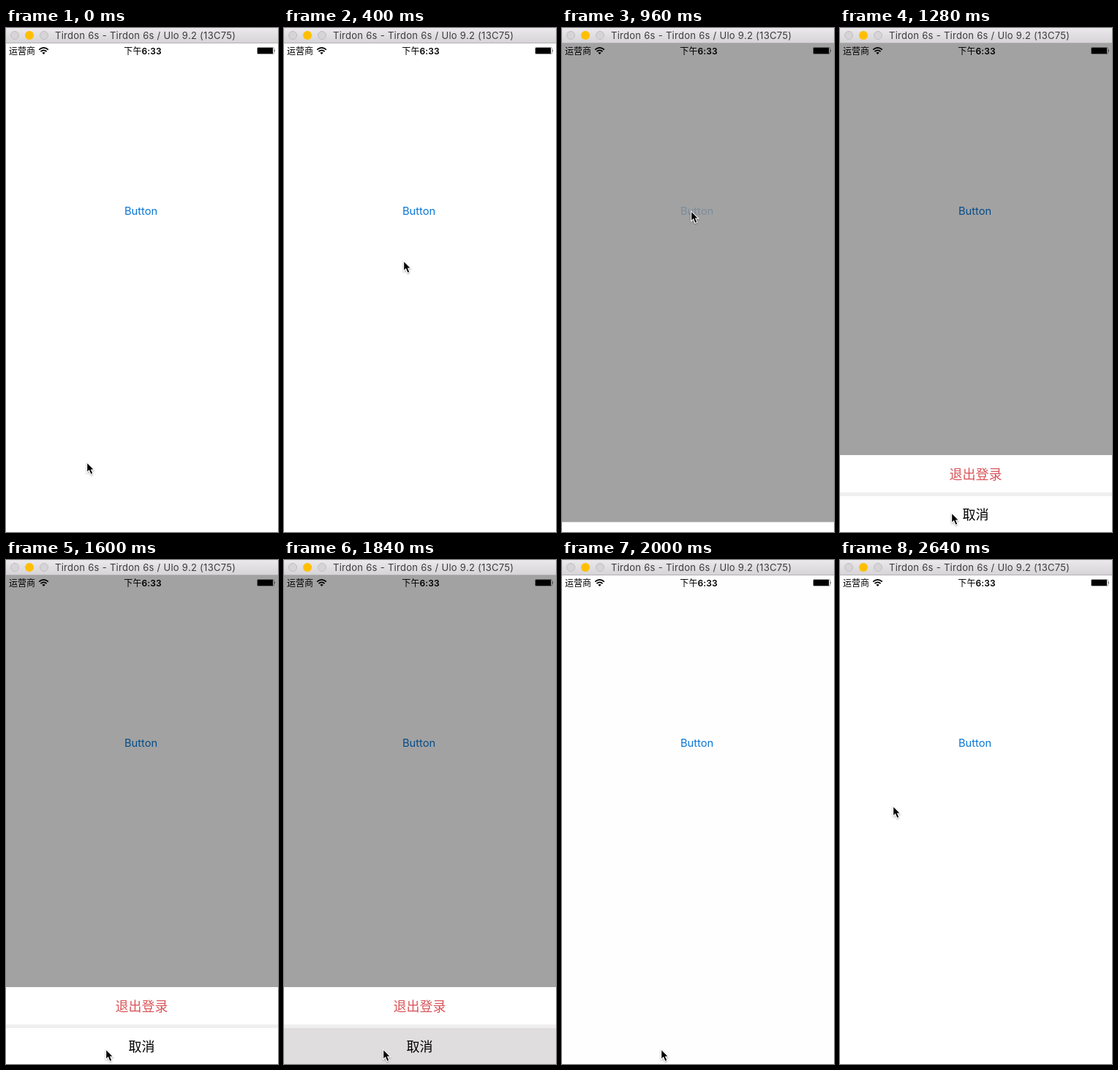
These frames come from a looping animation (372 px wide and 688 px high, 3.12 s). An HTML page:

```html
<!DOCTYPE html>
<html lang="zh-CN">
<head>
<meta charset="utf-8">
<title>Action sheet</title>
<style>
  html, body { margin: 0; width: 100%; height: 100%; overflow: hidden; background: #fff; }
  svg { display: block; }
  text { font-family: Inter, "Noto Sans CJK SC", "Noto Sans CJK", sans-serif; }
  .mid { text-anchor: middle; }
  .row { font-size: 18px; text-anchor: middle; }
</style>
</head>
<body>
<svg width="372" height="688" viewBox="0 0 372 688">
  <defs>
    <linearGradient id="chrome" x2="0" y2="1">
      <stop offset="0" stop-color="#ebe9eb"/>
      <stop offset="1" stop-color="#d6d4d6"/>
    </linearGradient>
    <filter id="shadow" x="-50%" y="-50%" width="200%" height="200%">
      <feDropShadow dx="0" dy="1" stdDeviation="0.9" flood-opacity="0.4"/>
    </filter>
  </defs>

  <rect width="372" height="688" fill="#fff"/>
  <text id="button" class="mid" x="184.5" y="255" font-size="14.7" fill="#0876d4">Button</text>
  <rect id="dim" y="21" width="372" height="667" fill="#000" fill-opacity="0.363"/>

  <g id="sheet">
    <rect y="583" width="372" height="105" fill="#fff"/>
    <rect y="634" width="372" height="5" fill="#f0eff0"/>
    <rect id="pressed" y="639" width="372" height="49" fill="#dfddde"/>
    <text class="row" x="185.5" y="616" fill="#d9555a">退出登录</text>
    <text class="row" x="185.5" y="671" fill="#000">取消</text>
  </g>

  <g id="status">
    <text x="4" y="35.5" font-size="12">运营商</text>
    <g fill="none" stroke="#000" stroke-width="1.7">
      <path d="M45.2 29.7Q51.5 24.2 57.8 29.7"/>
      <path d="M47.4 32.2Q51.5 28.7 55.6 32.2"/>
    </g>
    <path d="M49.3 33.8Q51.5 32 53.7 33.8L51.5 36Z"/>
    <text class="mid" x="187" y="35.5" font-size="12" font-weight="600" letter-spacing="0.1"><tspan font-weight="500">下午</tspan>6:33</text>
    <rect x="343.5" y="26.5" width="23" height="9" rx="1.5" fill="none" stroke="#000" stroke-opacity="0.35"/>
    <rect x="344" y="27" width="21" height="8" rx="0.5"/>
    <path d="M367 29.3q1.4 1.7 0 3.4z"/>
  </g>

  <g id="titlebar">
    <rect width="372" height="20" fill="url(#chrome)"/>
    <rect y="20" width="372" height="1" fill="#b3b1b3"/>
    <g fill="#d6d4d6" stroke="#c0bec0">
      <circle cx="12" cy="10" r="5.5"/>
      <circle cx="32" cy="10" r="6" fill="#ffbf00" stroke="none"/>
      <circle cx="52" cy="10" r="5.5"/>
    </g>
    <text x="67" y="15" font-size="13" letter-spacing="0.28" fill="#3c3c3c">Tirdon 6s - Tirdon 6s / Ulo 9.2 (13C75)</text>
  </g>

  <g id="cursor">
    <g transform="translate(-8 -5)" filter="url(#shadow)">
      <path fill="#fff" d="M8.2 4.9V20.9L12.6 16.6L13 16.5H19.8ZM9 12L13.7 23.1L17.3 21.6L12.7 10.5Z"/>
      <path d="M9.2 7.3V18.5L12.2 15.6L12.6 15.5H17.4Z"/>
      <rect x="-1" y="-4" width="2" height="8" transform="translate(13.7 17.8) rotate(-22.8)"/>
    </g>
  </g>
</svg>

<script>
const LOOP = 3120, TICK = 80, SHEET_HEIGHT = 105;
const TAP = 960, CANCEL = 1840;

// Each glide starts where the one before it ended.
const start = { x: 110, y: 592 };
const glides = [
  { from: 0, to: 720, x: 176, y: 249 },
  { from: 1040, to: 1280, x: 152, y: 661 },
  { from: 1280, to: 1680, x: 135, y: 667 },
  { from: 2080, to: 2400, x: 72, y: 335 },
];

const $ = id => document.getElementById(id);
const ramp = (t, from, to) => Math.min(1, Math.max(0, (t - from) / (to - from)));
const easeOut = p => p * (2 - p);
const easeInOut = p => p * p * (3 - 2 * p);
const translate = (x, y) => `translate(${x} ${y})`;

function cursorAt(t) {
  return glides.reduce((at, glide) => {
    const p = easeOut(ramp(t, glide.from, glide.to));
    return { x: at.x + (glide.x - at.x) * p, y: at.y + (glide.y - at.y) * p };
  }, start);
}

function draw(t) {
  const shown = easeInOut(ramp(t, TAP - 45, TAP + 155));
  const hidden = easeInOut(ramp(t, CANCEL + 10, CANCEL + 170));
  const { x, y } = cursorAt(t);

  $('cursor').setAttribute('transform', translate(Math.round(x), Math.round(y)));
  $('sheet').setAttribute('transform', translate(0, SHEET_HEIGHT * (1 - shown + hidden)));
  $('dim').style.opacity = t < TAP ? 0 : 1 - hidden;
  $('button').style.opacity = t < TAP ? 1 : 0.25 + 0.75 * easeInOut(ramp(t, TAP, TAP + 200));
  $('pressed').style.opacity = t >= CANCEL && t < CANCEL + TICK ? 1 : 0;
}

const begin = performance.now();
function tick(now) {
  const t = Math.max(0, now - begin) % LOOP;
  draw(Math.floor(t / TICK) * TICK);
  requestAnimationFrame(tick);
}
draw(0);
requestAnimationFrame(tick);
</script>
</body>
</html>
```
